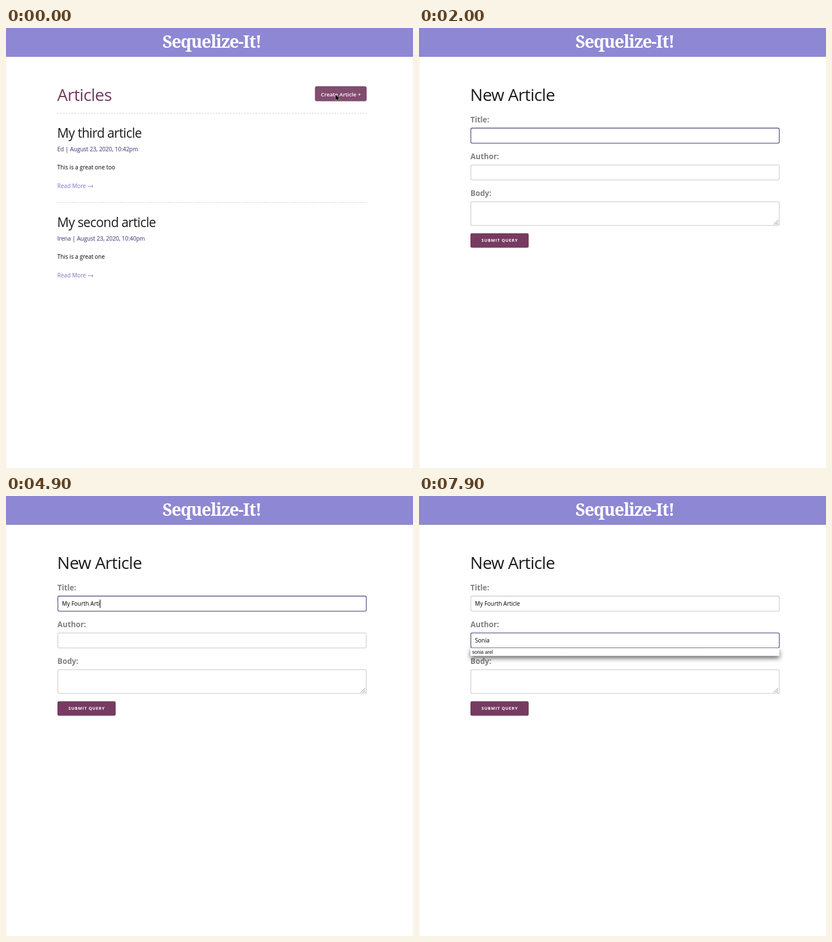
An HTML page for the animation above (8 s loop, 720x778 px).

```html
<!DOCTYPE html>
<html lang="en">
<head>
<meta charset="utf-8">
<title>Articles</title>
<style>
html, body { margin: 0; width: 100%; height: 100%; overflow: hidden; background: #fff; }
svg { display: block; width: 720px; height: 778px; }
text { font-family: "Open Sans", sans-serif; white-space: pre; }
.menu rect { filter: drop-shadow(0 4px 4px rgba(0, 0, 0, .6)); }
.menu text { font-family: "Liberation Sans", Arial, sans-serif; }
</style>
</head>
<body>
<script>
const NS = "http://www.w3.org/2000/svg";
const PURPLE = "#8e88d4", PLUM = "#773b62", INK = "#1c1c1c", META = "#5a5587";

function add(parent, tag, attrs, content) {
  const el = document.createElementNS(NS, tag);
  for (const k in attrs) el.setAttribute(k, attrs[k]);
  if (content !== undefined) el.textContent = content;
  parent.appendChild(el);
  return el;
}
const group = (parent, cls = "") => add(parent, "g", { class: cls });
const rect = (p, x, y, width, height, fill, rx = 0) =>
  add(p, "rect", { x, y, width, height, fill, rx });
const label = (p, s, x, y, size, fill, more = {}) =>
  add(p, "text", { x, y, "font-size": size, fill, ...more }, s);
const show = (el, on) => el.setAttribute("visibility", on ? "visible" : "hidden");

const svg = add(document.body, "svg", { viewBox: "0 0 720 778" });
rect(svg, 0, 0, 1, 778, "#f2f2f2");
rect(svg, 0, 0, 720, 51, PURPLE);
label(svg, "Sequelize-It!", 364, 35, 30, "#fff", {
  "font-weight": 600, "letter-spacing": -1.2, "text-anchor": "middle",
  style: "font-family:'Noto Serif',serif"
});

// Article list
const list = group(svg);
const heading = (p, s, fill) => label(p, s, 90.6, 128.5, 29.8, fill, { "letter-spacing": -.67 });

function article(y, title, meta, body) {
  add(list, "path", { d: `M91 ${y + .5}H638`, stroke: "#d4d4d4", "stroke-dasharray": "3 2" });
  label(list, title, 90.6, y + 44, 22.8, INK, { "letter-spacing": -.65 });
  label(list, meta, 90.8, y + 67.5, 10, META, { stroke: META, "stroke-width": .2 });
  label(list, body, 90.8, y + 100.3, 10, "#000");
  label(list, "Read More", 90.8, y + 133, 10, "#7b73c9");
  add(list, "path", {
    d: `M145 ${y + 130}h9m-2.2 -2l2.2 2l-2.2 2`, fill: "none", stroke: "#7b73c9", "stroke-width": .9
  });
}
heading(list, "Articles", "#703a60");
rect(list, 546.5, 103, 91.5, 26.5, "#824c6f", 3.5);
label(list, "Create Article +", 592.3, 121, 9.6, "#fff", { "font-weight": 600, "text-anchor": "middle" });
article(150, "My third article", "Ed | August 23, 2020, 10:42pm", "This is a great one too");
article(308, "My second article", "Irena | August 23, 2020, 10:40pm", "This is a great one");

// Form
const form = group(svg);
heading(form, "New Article", INK);

function field(name, y, height) {
  label(form, name, 91, y - 9, 13.3, "#808080", { "font-weight": 700 });
  const box = add(form, "rect", {
    x: 91.7, y: y + .7, width: 545.7, height: height - 1.4, rx: 2.4,
    fill: "#fff", stroke: "#d1d1d1", "stroke-width": 1.3
  });
  return { box, y, text: label(form, "", 99, y + 17.8, 10, "#000") };
}
const title = field("Title:", 176.3, 28);
const author = field("Author:", 241.4, 28);
field("Body:", 306.4, 43.4);
add(form, "path", {
  d: "M627.5 347.5l8-8M631 347.5l4.5-4.5M634 347.5l1.5-1.5", stroke: "#777", "stroke-width": .9
});
rect(form, 91, 363, 103, 25.5, PLUM, 2.7);
label(form, "SUBMIT QUERY", 142.8, 378.4, 7.33, "#fff", {
  "font-weight": 700, "letter-spacing": .8, "text-anchor": "middle"
});

function menu(y, items) {
  const g = group(form, "menu");
  rect(g, 91, y, 546.5, items.length * 14, "#fff", 1);
  items.forEach((s, i) => label(g, s, 94, y + 10.3 + i * 14, 8.5, "#111"));
  return g;
}
const titleMenu = menu(203.6, ["My third article", "My second article", "My next article"]);
const authorMenu = menu(268.8, ["sonia arel"]);
const caret = rect(form, 99, 183, 1, 15, "#000");

// Mouse pointers
const arrow = add(svg, "path", {
  d: "M0 0V9.6L2.2 7.6L3.7 11L5.3 10.3L3.9 7.1L6.9 6.8Z",
  stroke: "#fff", "stroke-width": .8, "paint-order": "stroke"
});
const beam = add(svg, "path", {
  d: "M-2 -6q2 0 2 1.5q0 -1.5 2 -1.5M0 -5V5M-2 6q2 0 2 -1.5q0 1.5 2 1.5",
  fill: "none", stroke: "#222", "stroke-width": .9
});
const move = (el, x, y) => el.setAttribute("transform", `translate(${x} ${y})`);

// [time, characters typed]
const titleKeys = [[2100, 1], [2300, 2], [2500, 3], [2700, 4], [2800, 6], [2900, 7], [3100, 8],
  [3300, 9], [3500, 10], [3700, 11], [4600, 12], [4900, 14], [5100, 15], [5200, 16], [5300, 17]];
const authorKeys = [[6600, 1], [6800, 2], [7000, 3], [7200, 4], [7300, 5], [7500, 6]];
// Times when the caret is hidden
const blinks = [[1700, 2100], [4000, 4500], [6200, 6600], [7900, 8000]];

const within = (t, a, b) => t >= a && t < b;
const typed = (s, keys, t) => s.slice(0, keys.reduce((n, [at, k]) => t >= at ? k : n, 0));
const pen = document.createElement("canvas").getContext("2d");

function draw(now) {
  const t = Math.floor((now % 8000) / 100) * 100;
  show(list, t < 100);
  form.style.display = t < 100 ? "none" : "";

  const p = Math.min(1, Math.max(0, (t - 300) / 600));
  const e = p * p * (3 - 2 * p);
  const x = 583 - 345 * e, y = 118 + 81 * e;
  const inField = y > 176;
  move(arrow, x, y);
  move(beam, x, t < 1100 ? y : 204);
  show(arrow, !inField);
  show(beam, inField && t < 2000);

  title.text.textContent = typed("My Fourth Article", titleKeys, t);
  author.text.textContent = typed("Sonia ", authorKeys, t);
  const active = t < 1200 ? null : t < 5700 ? title : author;
  for (const f of [title, author])
    f.box.setAttribute("stroke", f === active ? META : "#d1d1d1");
  titleMenu.style.display = within(t, 2100, 2700) ? "" : "none";
  authorMenu.style.display = t >= 6700 ? "" : "none";

  caret.style.display = active && !blinks.some(([a, b]) => within(t, a, b)) ? "" : "none";
  if (active) {
    pen.font = '10px "Open Sans", sans-serif';
    caret.setAttribute("x", Math.round(99 + pen.measureText(active.text.textContent).width));
    caret.setAttribute("y", active === title ? 183 : 248);
  }
}

function loop() {
  draw(performance.now());
  requestAnimationFrame(loop);
}
loop();
</script>
</body>
</html>
```
